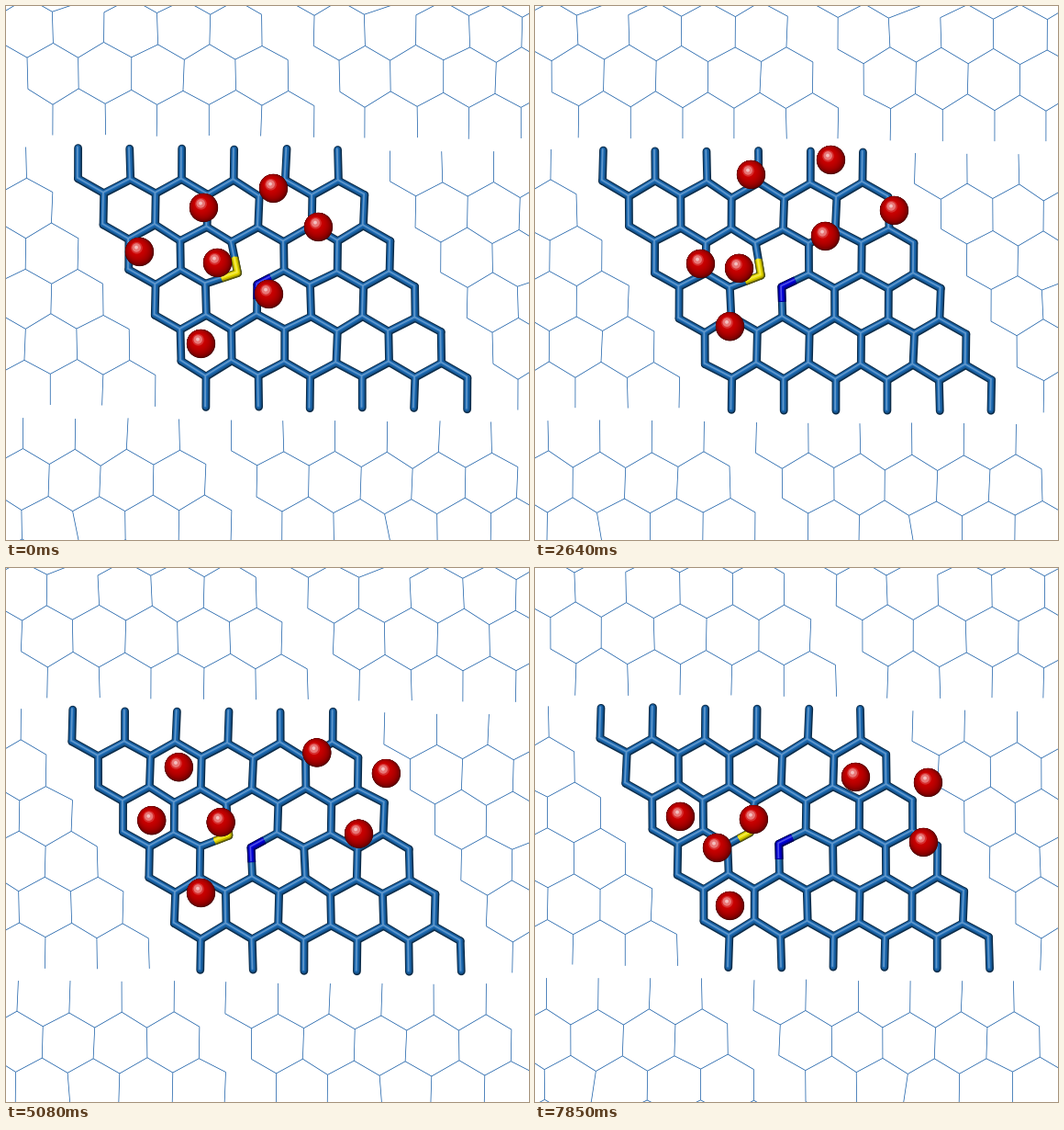
These frames come from a looping animation (570x581 px, 8 s). A matplotlib script:

```python
import numpy as np
import matplotlib.pyplot as plt
from matplotlib.animation import FuncAnimation
from matplotlib.collections import LineCollection

W, H, DPI = 570, 581, 100
PX = 72 / DPI
LOOP, INTERVAL = 8000, 40
LAST_STEP, LAST_TIME = 58, 7850
ROWS, COLS = 5, 6
LIGHT = np.array([-0.5, -0.7])
rng = np.random.default_rng(4)


def drift(step):
    """Slow wander of the whole sheet."""
    return np.array([-7.5 * (1 - np.exp(-step / 20)),
                     2.6 * np.sin(np.pi * step / 40)])


# Atoms: "A" is the upper and "B" the lower tip of each zigzag row.
atoms, rest = {}, []
for row in range(-1, ROWS + 1):
    for col in range(COLS):
        for kind, dx, dy in (("A", 0, 0), ("B", 28.2, 16)):
            x = 78 + 28 * row + 56.7 * col + dx
            atoms[kind, row, col] = len(rest)
            rest.append((x, 187.3 + 49.6 * row + dy + 0.006 * (x - 78)))
rest = np.array(rest)

# The lattice closes in a little around the broken bond.
to_gap = np.array([262, 285]) - rest
pull = np.exp(-(np.hypot(*to_gap.T) / 70) ** 2)
rest += pull[:, None] * np.column_stack([np.full(len(rest), -3), 0.08 * to_gap[:, 1]])

S, N = atoms["A", 2, 2], atoms["B", 2, 2]
S_ENDS = atoms["B", 1, 2], atoms["B", 2, 1]
N_ENDS = atoms["A", 2, 3], atoms["A", 3, 2]

bonds = []
for row in range(ROWS + 1):
    for col in range(COLS):
        here = atoms["A", row, col]
        bonds.append((atoms["B", row - 1, col], here))
        if row < ROWS:
            bonds.append((here, atoms["B", row, col]))
            if col:
                bonds.append((atoms["B", row, col - 1], here))
bonds = np.array([b for b in bonds if set(b) != {S, N}])

phase = rng.uniform(0, 2 * np.pi, rest.shape)
speed = rng.uniform(0.35, 0.9, rest.shape)


def positions(step):
    pos = rest + 0.7 * np.sin(phase + speed * step)
    pos[S] = 246 + 6 * np.cos(2 * np.pi * step / 17), 290
    return pos + drift(step)


# Wandering balls pass through a few points; two others only rattle in place.
KNOTS = 0, 19, 32, 50, 58
PATHS = [
    [(215, 219), (235, 183), (201, 206), (154, 243), (158, 270)],
    [(291, 198), (322, 167), (327, 188), (368, 233), (349, 227)],
    [(340, 240), (391, 222), (407, 225), (432, 218), (428, 233)],
    [(145, 267), (180, 280), (158, 264), (159, 301), (198, 304)],
    [(286, 313), (316, 250), (366, 281), (431, 309), (423, 298)],
]


def along(path, step):
    return [np.interp(step, KNOTS, axis) for axis in zip(*path)]


def ball_centers(step):
    swing = np.sin(2 * np.pi * step / 26)
    trapped = (230 + 8 * swing, 279 - 6 * swing)
    lower = (212, 355 + 12 * np.cos(2 * np.pi * step / 29))
    return np.array([along(p, step) for p in PATHS] + [trapped, lower])


# Other periodic copies of the sheet that reach into the picture.
CELL_A, CELL_B = np.array([340, 3]), np.array([167, 296])
IMAGES = np.array([m * CELL_A + n * CELL_B for m, n in
                   [(-1, 0), (1, 0), (0, 1), (-1, 1), (0, -1), (1, -1)]])

fig = plt.figure(figsize=(W / DPI, H / DPI), dpi=DPI, facecolor="white")
ax = fig.add_axes([0, 0, 1, 1])
ax.set(xlim=(-.5, W - .5), ylim=(H - .5, -.5))
ax.axis("off")


def lines(color, width, **style):
    return ax.add_collection(LineCollection([], colors=[color], linewidths=width * PX,
                                            **style), autolim=False)


def tube(base, **style):
    """Stacked strokes, dark rim to bright core."""
    base = np.array(base)
    colors = 0.4 * base, 0.8 * base, base, base + 0.3 * (1 - base)
    return [lines(c, w, joinstyle="round", **style)
            for c, w in zip(colors, (8.8, 6.4, 3.8, 1.7))]


thin = lines("#1a5fa8", 0.75, zorder=1)
carbon = tube((.11, .42, .71), capstyle="round", zorder=2)
yellow = tube((.93, .88, 0), capstyle="butt", zorder=3)
blue = tube((0, 0, .86), capstyle="butt", zorder=3)

# Each ball is a pile of discs shrinking towards its highlight.
depth = np.linspace(0, 1, 20)
radius = 15.6 * np.sqrt(1 - 0.985 * depth ** 1.5)
toward = 7 * depth[:, None] ** 1.3 * LIGHT
red = 0.2 + 0.65 * depth ** 0.6
glow = 0.75 * np.clip((depth - 0.86) / 0.14, 0, 1)
shade = np.column_stack([red + glow * (1 - red), glow, glow])
n_balls = len(ball_centers(0))
spheres = ax.scatter(*np.zeros((2, n_balls * len(depth))),
                     s=np.tile((2 * radius * PX) ** 2, n_balls),
                     c=np.tile(shade, (n_balls, 1)), linewidths=0, zorder=4)


def elbow(pos, center, ends):
    """The two half bonds that meet in one atom."""
    first, last = ((pos[center] + pos[e]) / 2 for e in ends)
    return np.array([[first, pos[center], last]])


def draw(frame):
    now = (frame + 0.5) * INTERVAL
    step = min(int(now / LAST_TIME * LAST_STEP), LAST_STEP)
    pos = positions(step)
    segments = pos[bonds]
    thin.set_segments((segments[None] + IMAGES[:, None, None]).reshape(-1, 2, 2))
    for layers, paths in ((carbon, segments), (yellow, elbow(pos, S, S_ENDS)),
                          (blue, elbow(pos, N, N_ENDS))):
        for level, layer in enumerate(layers):
            layer.set_segments(paths + 0.5 * level * LIGHT)
    spheres.set_offsets((ball_centers(step)[:, None] + toward).reshape(-1, 2))
    return thin, *carbon, *yellow, *blue, spheres


anim = FuncAnimation(fig, draw, frames=LOOP // INTERVAL, interval=INTERVAL,
                     repeat=True, repeat_delay=0)
plt.show()
```
